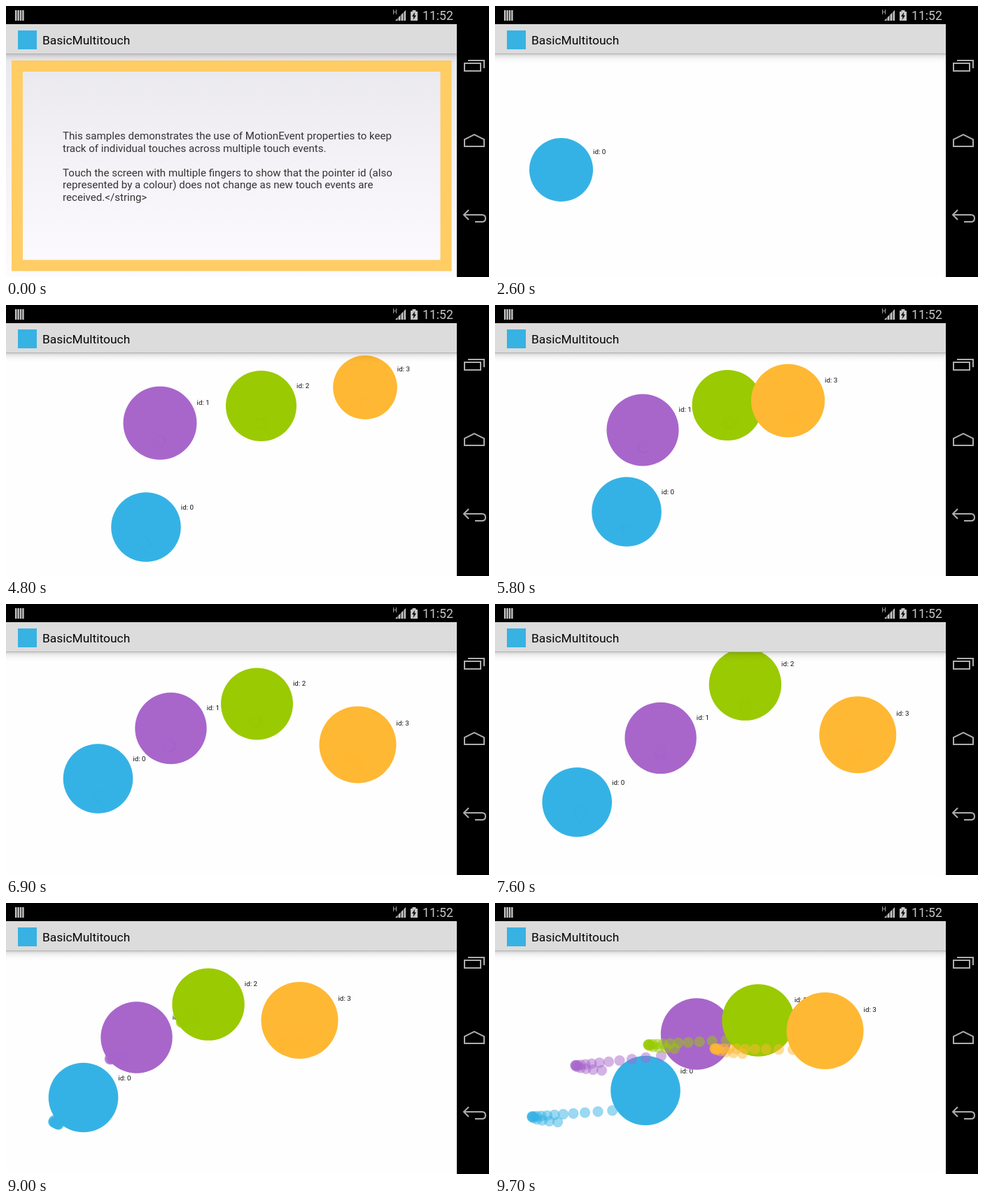
An HTML page with a canvas that plays this animation: 690 px wide and 388 px high, repeating every 9800 ms.

```html
<!DOCTYPE html>
<html lang="en">
<head>
<meta charset="utf-8">
<title>BasicMultitouch</title>
<style>
  html, body { margin: 0; width: 100%; height: 100%; overflow: hidden; background: #000; }
  canvas { display: block; width: 690px; height: 388px; }
</style>
</head>
<body>
<canvas id="stage" width="690" height="388"></canvas>
<script>
const ctx = document.getElementById('stage').getContext('2d');
const LOOP = 9800, STEP = 100;
const WIDTH = 644, TOP = 69, BOTTOM = 388;
const HISTORY = 20, SAMPLE = 1000 / 60, DOT = 7.6;
const GREY = '#adadad', LIGHT = '#c6c6c6';

// The fingers rest together at these times and glide in between.
const RESTS = [2600, 4800, 5800, 6900, 7960, 8300, 9490, 9700];
const SWING = { from: 8900, to: 9470, dx: 170, dy: 9 };

const touches = [
  { color: '#35b2e5', appears: 100, radius: [45.5, 49.8], grows: 2600,
    path: [[94.5, 234.5], [200, 318], [188, 296], [131.5, 250],
           [112, 296], [82.5, 296], [53, 281], [215, 268.5]] },
  { color: '#a866cb', appears: 3000, radius: [52.5, 51.2], grows: 4800,
    path: [[196, 166], [220, 169], [211, 179], [235.5, 178],
           [237, 197], [182.5, 189.5], [115, 207], [288, 187.5]] },
  { color: '#9aca02', appears: 3300, radius: [50.5, 51.7], grows: 5800,
    path: [[360, 148], [364.5, 144.5], [332, 143.5], [358.5, 143],
           [357, 105], [282.5, 112.5], [219, 177], [376, 168]] },
  { color: '#ffb833', appears: 3700, radius: [45.8, 55], grows: 4800,
    path: [[526, 124], [513, 118], [418.5, 137], [502.5, 201.5],
           [524, 182], [473.5, 167.5], [314, 181], [471.5, 183]] }
];

const clamp = u => Math.min(Math.max(u, 0), 1);
const lerp = (a, b, u) => a + (b - a) * u;
const smooth = u => u * u * (3 - 2 * u);
const progress = (t, from, to) => clamp((t - from) / (to - from));

function pose({ path, radius, grows }, t) {
  const last = RESTS.length - 2;
  let i = 0;
  while (i < last && t >= RESTS[i + 1]) i++;
  const u = progress(t, RESTS[i], RESTS[i + 1]);
  const e = i === last ? u * u : smooth(u);
  const p = progress(t, SWING.from, SWING.to);
  return {
    x: lerp(path[i][0], path[i + 1][0], e) + SWING.dx * Math.sin(Math.PI * p) ** 2,
    y: lerp(path[i][1], path[i + 1][1], e) - SWING.dy * Math.sin(2 * Math.PI * p),
    r: lerp(...radius, smooth(progress(t, grows, grows + 1500)))
  };
}

function rect(x, y, w, h, fill) {
  ctx.fillStyle = fill;
  ctx.fillRect(x, y, w, h);
}

function disc(x, y, r) {
  ctx.beginPath();
  ctx.arc(x, y, r, 0, Math.PI * 2);
  ctx.fill();
}

function text(str, x, y, size, fill) {
  ctx.font = `${size}px Roboto, sans-serif`;
  ctx.fillStyle = fill;
  ctx.fillText(str, x, y);
}

function shade(y0, y1, ...stops) {
  const g = ctx.createLinearGradient(0, y0, 0, y1);
  stops.forEach((c, i) => g.addColorStop(i / (stops.length - 1), c));
  return g;
}

function line(path) {
  ctx.strokeStyle = GREY;
  ctx.lineWidth = 2;
  ctx.stroke(new Path2D(path));
}

function shape(path, fill) {
  ctx.fillStyle = fill;
  ctx.fill(new Path2D(path));
}

function drawIntro() {
  rect(0, TOP, WIDTH, BOTTOM - TOP, shade(TOP, BOTTOM, '#e9e8ec', '#f4f2f7', '#fdfbfe'));
  ctx.strokeStyle = '#ffcd64';
  ctx.lineWidth = 16;
  ctx.strokeRect(16, 86, 612.5, 285.5);
  [
    'This samples demonstrates the use of MotionEvent properties to keep',
    'track of individual touches across multiple touch events.',
    '',
    'Touch the screen with multiple fingers to show that the pointer id (also',
    'represented by a colour) does not change as new touch events are',
    'received.</string>'
  ].forEach((s, i) => text(s, 81, Math.round(191 + i * 17.6), 15.1, '#333'));
}

function drawTouch(touch, id, t) {
  if (t < touch.appears) return;
  const { x, y, r } = pose(touch, t);
  ctx.fillStyle = touch.color;
  disc(x, y, r);
  // The touch point itself lies half a radius below the disc centre.
  ctx.globalAlpha = 0.49;
  for (let i = 0; i < HISTORY; i++) {
    const past = pose(touch, t - i * SAMPLE);
    disc(past.x, past.y + past.r / 2, DOT);
  }
  ctx.globalAlpha = 1;
  text('id: ' + id, x + r, y - r / 2, 9.8, '#111');
}

function drawTouches(t) {
  rect(0, TOP, WIDTH, BOTTOM - TOP, '#fefefe');
  ctx.save();
  ctx.beginPath();
  ctx.rect(0, TOP, WIDTH, BOTTOM - TOP);
  ctx.clip();
  touches.forEach((touch, id) => drawTouch(touch, id, t));
  ctx.restore();
}

function drawActionBar() {
  rect(0, 26, WIDTH, TOP - 26, '#dcdcdc');
  rect(0, TOP - 1, WIDTH, 14,
    shade(TOP - 1, TOP + 13, 'rgba(0,0,0,.2)', 'rgba(0,0,0,.07)', 'rgba(0,0,0,.02)', 'rgba(0,0,0,0)'));
  rect(17, 35, 27, 27, '#38b2e2');
  text('BasicMultitouch', 52, 55, 17.4, '#050505');
}

function drawStatusBar() {
  rect(0, 0, WIDTH, 26, '#000');
  for (let i = 0; i < 4; i++) rect(13 + i * 3.4, 6, 2.4, 15, LIGHT);
  text('H', 552.5, 12, 8.5, LIGHT);
  shape('M556 21L571 6V21Z', LIGHT);
  for (let i = 1; i < 4; i++) rect(555.5 + i * 4, 5, 1, 16, '#000');
  shape('M580.5 6H585.5V8H588V21H578V8H580.5Z', LIGHT);
  shape('M584 9L580 15H582.5L581.5 20L586 13.5H583.5Z', '#000');
  text('11:52', 595, 20, 17.6, LIGHT);
}

function drawNavBar() {
  rect(WIDTH, 0, 690 - WIDTH, BOTTOM, '#000');
  line('M655 82H678V93H655ZM660 78H683V89');
  line('M655 201V191L669 184L683 191V201Z');
  line('M661 292L654 299L661 306M655 299H680Q685 299 685 304T680 309H670');
}

function draw(now) {
  const t = Math.floor((now % LOOP) / STEP) * STEP;
  if (t < STEP) drawIntro();
  else drawTouches(t);
  drawActionBar();
  drawStatusBar();
  drawNavBar();
}

let began;
function tick(now) {
  began ??= now;
  draw(now - began);
  requestAnimationFrame(tick);
}
draw(0);
requestAnimationFrame(tick);
</script>
</body>
</html>
```
